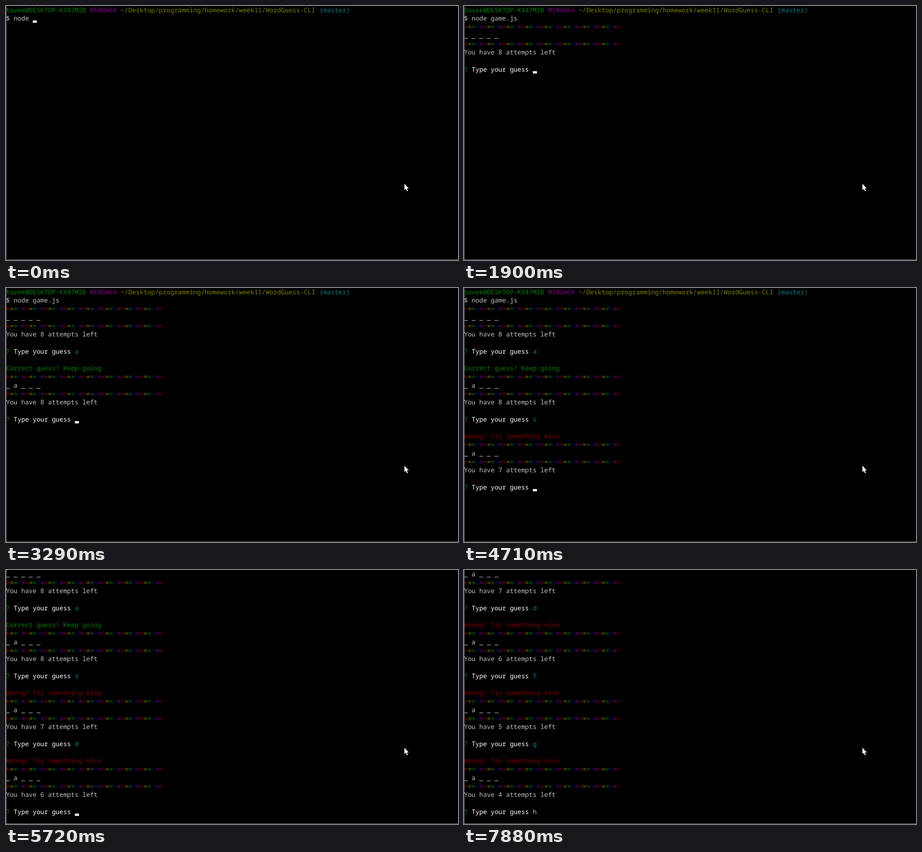
An HTML page for the animation above (8000 ms loop, 998 by 561 pixels).

```html
<!DOCTYPE html>
<html lang="en">
<head>
<meta charset="utf-8">
<title>Word game in a terminal</title>
<style>
  html, body { margin: 0; width: 100%; height: 100%; overflow: hidden; background: #000; }
  #stage { position: relative; width: 998px; height: 561px; overflow: hidden; background: #000; }
  #screen { position: absolute; left: 0; top: -0.4px; }
  #screen span {
    position: absolute;
    white-space: pre;
    font: 500 14.0667px/19px "Noto Sans Mono", monospace;
    text-rendering: geometricPrecision;
    font-variant-ligatures: none;
  }
  #cursor { position: absolute; width: 9px; height: 5px; background: #fff; }
  #frame {
    position: absolute; inset: 0; box-sizing: border-box;
    border: solid #808080; border-width: 0 0 1px 1px;
  }
  #pointer { position: absolute; left: 879px; top: 392px; }
</style>
</head>
<body>
<div id="stage">
  <div id="screen"></div>
  <div id="cursor"></div>
  <div id="frame"></div>
  <svg id="pointer" width="12" height="18">
    <path d="M.7.6V14.6L3.8 11.8 6.2 17 8.4 16 6 11H10.2Z" fill="#fff"/>
  </svg>
</div>
<script>
const LOOP = 8000, CELL = 8.44, LINE = 18.75, LAST_ROW = 28;
const RED = '#800000', YELLOW = '#808000', GREEN = '#008000', BLUE = '#000080',
      MAGENTA = '#800080', CYAN = '#008080', GRAY = '#c0c0c0', WHITE = '#fff';
const RAINBOW = [RED, YELLOW, GREEN, BLUE, MAGENTA];
const GUESSES = 'asdfg';

// [start ms, command, rounds shown, typed letter, cursor visible]
const CMD = 'game.js ';
const STEPS = [
  [0, '', 0, '', 1],
  [120, 'g', 0, '', 1],
  [270, CMD, 0, '', 1],
  [640, CMD, 0, '', 0],
  [1210, CMD, 0, '', 1],
  [1350, CMD + '\n', 0, '', 1],
  [1620, CMD + '\n', 0, '', 0],
  [1900, CMD, 1, '', 1],
  [2180, CMD, 1, '', 0],
  [2640, CMD, 1, '', 1],
  [3140, CMD, 1, 'a', 1],
  [3290, CMD, 2, '', 1],
  [3720, CMD, 2, '', 0],
  [4190, CMD, 2, 's', 0],
  [4310, CMD, 2, 's', 1],
  [4710, CMD, 3, '', 1],
  [4860, CMD, 3, '', 0],
  [5290, CMD, 3, 'd', 1],
  [5720, CMD, 4, '', 1],
  [5870, CMD, 4, '', 0],
  [6150, CMD, 4, 'f', 0],
  [6270, CMD, 4, 'f', 1],
  [6650, CMD, 5, '', 1],
  [6800, CMD, 5, '', 0],
  [7080, CMD, 5, 'g', 0],
  [7330, CMD, 5, 'g', 1],
  [7580, CMD, 6, '', 1],
  [7730, CMD, 6, 'h', 1],
  [7880, CMD, 6, 'h', 0]
];

const screen = document.getElementById('screen');
const cursor = document.getElementById('cursor');

function put(row, col, text, color) {
  const span = document.createElement('span');
  span.textContent = text;
  span.style.cssText = `left:${col * CELL}px;top:${row * LINE}px;color:${color}`;
  screen.append(span);
}

function rule(row) {
  for (let i = 0; i < 41; i++) put(row, i, '=', RAINBOW[i % 5]);
}

function drawHeader(command) {
  put(0, 0, 'tovek@DESKTOP-KX47M2B', GREEN);
  put(0, 22, 'MINGW64', MAGENTA);
  put(0, 30, '~/Desktop/programming/homework/week11/WordGuess-CLI', YELLOW);
  put(0, 82, '(master)', CYAN);
  put(1, 0, '$ node ' + command.trim(), GRAY);
}

function drawRound(k, typed, open) {
  const row = 2 + 8 * k;
  if (k === 1) put(row - 1, 0, 'Correct guess! Keep going', GREEN);
  if (k > 1) put(row - 1, 0, 'Wrong! Try something else', RED);
  rule(row);
  put(row + 1, 0, k ? '_ a _ _ _' : '_ _ _ _ _', GRAY);
  rule(row + 2);
  put(row + 3, 0, `You have ${8 - Math.max(0, k - 1)} attempts left`, GRAY);
  put(row + 5, 0, '?', GREEN);
  put(row + 5, 2, 'Type your guess', WHITE);
  put(row + 5, 18, open ? typed : GUESSES[k], open ? GRAY : CYAN);
}

function draw([, command, rounds, typed, blink]) {
  screen.replaceChildren();
  drawHeader(command);
  for (let k = 0; k < rounds; k++) drawRound(k, typed, k === rounds - 1);

  let row = 1, col = 7 + command.length;
  if (rounds) { row = 8 * rounds - 1; col = 18 + typed.length; }
  else if (command.endsWith('\n')) { row = 2; col = 0; }

  const scroll = Math.max(0, row - LAST_ROW);
  screen.style.transform = `translateY(${-scroll * LINE}px)`;
  cursor.style.left = Math.round(col * CELL) + 'px';
  cursor.style.top = Math.round((row - scroll + 1) * LINE - 0.8) - 5 + 'px';
  cursor.style.visibility = blink ? 'visible' : 'hidden';
}

let shown = null;
const start = performance.now();
function tick() {
  const t = (performance.now() - start) % LOOP;
  const step = STEPS.findLast(s => s[0] <= t) || STEPS[0];
  if (step !== shown) draw(shown = step);
  requestAnimationFrame(tick);
}
tick();
</script>
</body>
</html>
```
